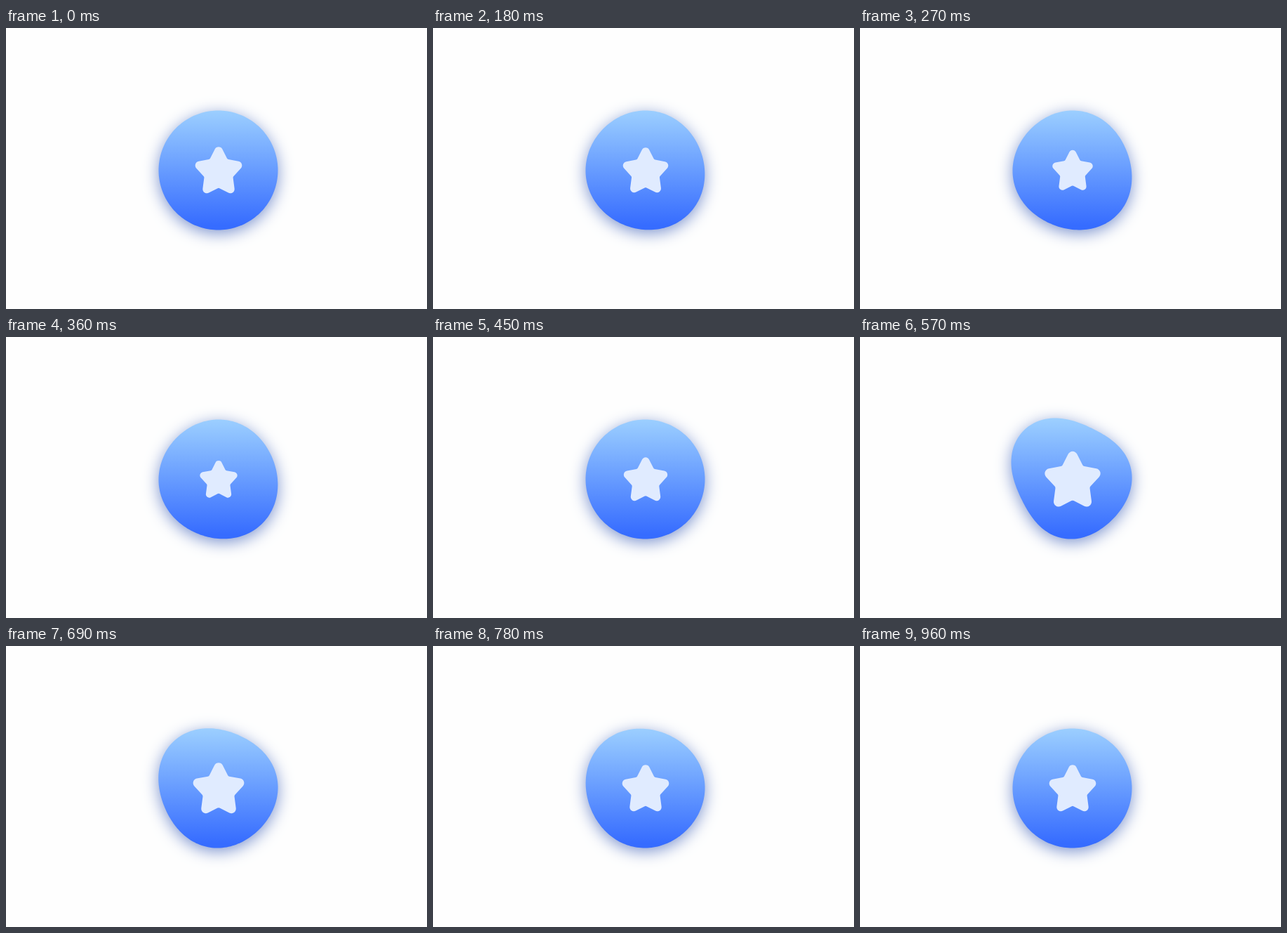
Animation, 600 px wide and 400 px high, one loop 1.17 s. Source, as an HTML page with a canvas:

```html
<!DOCTYPE html>
<html lang="en">
<head>
<meta charset="utf-8">
<title>Star button</title>
<style>
  html, body { margin: 0; width: 100%; height: 100%; overflow: hidden; background: #fefefe; }
  canvas { display: block; width: 600px; height: 400px; }
</style>
</head>
<body>
<canvas id="stage" width="600" height="400"></canvas>
<script>
const ctx = document.getElementById('stage').getContext('2d');
const LOOP = 1170, STEP = 30;
const CX = 302.5, CY = 202.5, R = 85;

const sky = ctx.createLinearGradient(0, 117, 0, 288);
sky.addColorStop(0, '#9ccfff');
sky.addColorStop(0.96, '#366cff');

// Progress of t from a to b, clamped to 0..1
const progress = (t, a, b) => Math.min(1, Math.max(0, (t - a) / (b - a)));
const ease = u => u * u * (3 - 2 * u);

// Shrink, pop, settle
function starScale(t) {
  return 1 - 0.2 * ease(progress(t, 120, 360))
    + 0.4 * ease(progress(t, 360, 590))
    - 0.2 * ease(progress(t, 590, 780));
}

// Negative pulls to the lower right, positive to the upper left
function bulge(t) {
  if (t < 450) return -0.4 * Math.sin(Math.PI * progress(t, 120, 450));
  if (t < 570) return ease(progress(t, 450, 570));
  return (1 - progress(t, 570, 960)) ** 1.6;
}

// A circle with three harmonics that peak along the pull direction
function blobPath(amount) {
  const axis = Math.PI * (amount < 0 ? 0.25 : 1.25), k = Math.abs(amount);
  ctx.beginPath();
  for (let i = 0; i < 180; i++) {
    const a = i * Math.PI / 90, p = a - axis;
    const r = R + k * (3.7 * Math.cos(p) + 5.2 * Math.cos(2 * p) + 4.8 * Math.cos(3 * p) - 0.7);
    ctx.lineTo(CX + r * Math.cos(a), CY + r * Math.sin(a));
  }
  ctx.closePath();
}

function starPath() {
  const points = Array.from({ length: 10 }, (_, i) => {
    const r = i % 2 ? 22.5 : 43, a = i * Math.PI / 5;
    return [0.955 * r * Math.sin(a), 2.5 - r * Math.cos(a)];
  });
  const [first, last] = [points[0], points[9]];
  ctx.beginPath();
  ctx.moveTo((first[0] + last[0]) / 2, (first[1] + last[1]) / 2);
  points.forEach((p, i) => ctx.arcTo(...p, ...points[(i + 1) % 10], i % 2 ? 3 : 6));
  ctx.closePath();
}

function draw(t) {
  ctx.fillStyle = '#fefefe';
  ctx.fillRect(0, 0, 600, 400);

  ctx.save();
  ctx.shadowColor = 'rgba(20, 62, 168, 0.55)';
  ctx.shadowBlur = 22;
  ctx.shadowOffsetY = 5;
  ctx.fillStyle = sky;
  blobPath(bulge(t));
  ctx.fill();
  ctx.restore();

  ctx.save();
  ctx.translate(303, CY);
  ctx.scale(starScale(t), starScale(t));
  ctx.fillStyle = '#e0ebff';
  starPath();
  ctx.fill();
  ctx.restore();
}

const start = performance.now();
function tick() {
  const t = (performance.now() - start) % LOOP;
  draw(Math.floor(t / STEP) * STEP);
  requestAnimationFrame(tick);
}
draw(0);
requestAnimationFrame(tick);
</script>
</body>
</html>
```
